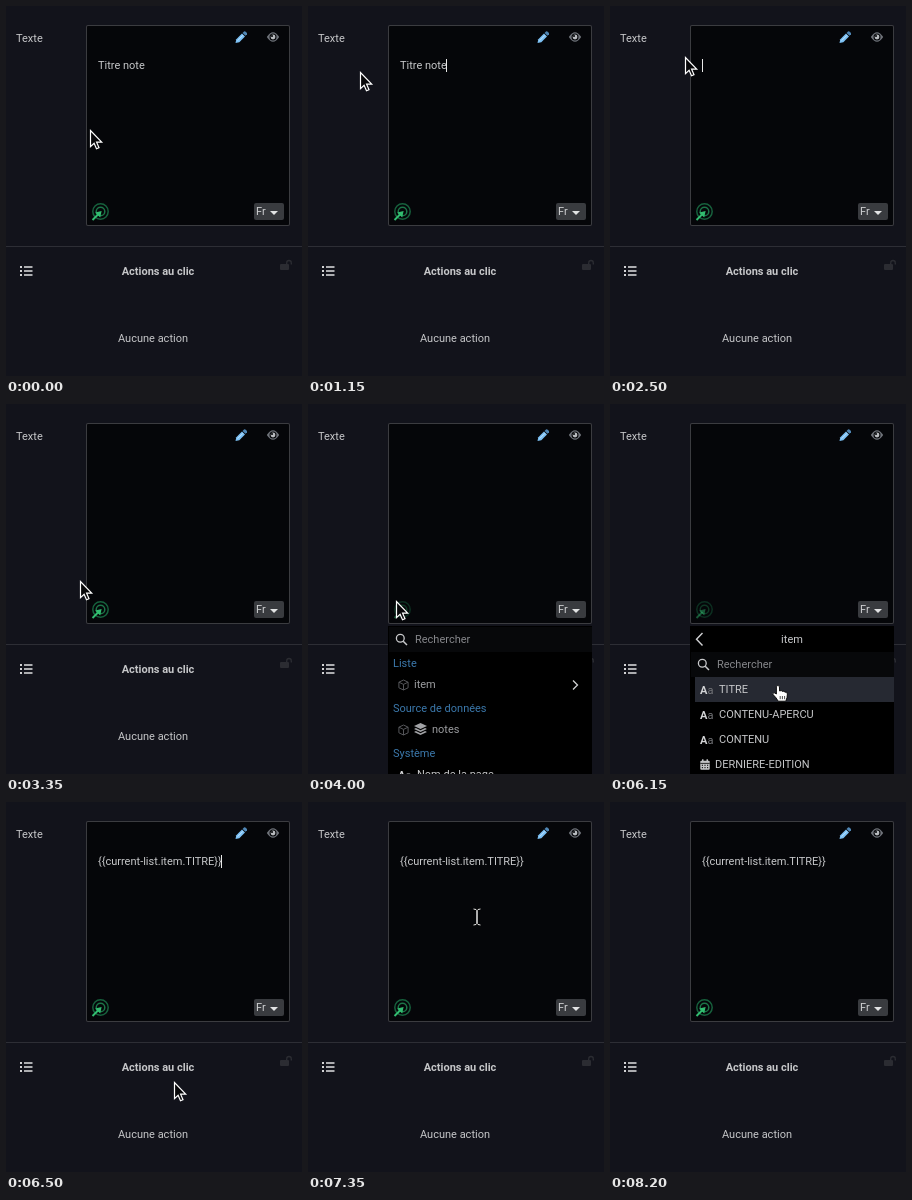
An HTML page with a canvas for the animation above (8.5 s loop, 296 by 370 pixels).

```html
<!DOCTYPE html>
<html lang="fr">
<head>
<meta charset="utf-8">
<title>Texte dynamique</title>
<style>
html, body { margin: 0; width: 100%; height: 100%; overflow: hidden; background: #12131b; }
canvas { display: block; width: 296px; height: 370px; }
</style>
</head>
<body>
<canvas id="stage"></canvas>
<script>
const W = 296, H = 370, LOOP = 8500, TICK = 50;
const canvas = document.getElementById('stage');
const ctx = canvas.getContext('2d');
const dpr = window.devicePixelRatio || 1;
canvas.width = W * dpr;
canvas.height = H * dpr;

// Pointer moves: start, end, target x, target y, shape on arrival
const MOVES = [
  [250, 300, 82, 122, 'arrow'],
  [350, 400, 143, 92, 'beam'],
  [550, 800, 160, 61, 'beam'],
  [900, 1150, 52, 66, 'arrow'],
  [1400, 1450, 71, 53, 'arrow'],
  [1750, 1800, 75, 51, 'arrow'],
  [3000, 3350, 74, 177, 'arrow'],
  [3350, 3750, 89, 195, 'arrow'],
  [3850, 3900, 88, 197, 'arrow'],
  [4300, 4350, 89, 198, 'arrow'],
  [4450, 4900, 275, 285, 'hand'],
  [5550, 5950, 195, 296, 'hand'],
  [6100, 6150, 168, 282, 'hand'],
  [6350, 6500, 168, 280, 'arrow'],
  [6700, 6850, 163, 277, 'arrow'],
  [6950, 7450, 170, 96, 'beam'],
  [7550, 7600, 168, 80, 'beam'],
  [7700, 7750, 168, 61, 'beam'],
  [7900, 8150, 79, 17, 'arrow']
];

const ease = u => u * u * (3 - 2 * u);

function pointerAt(t) {
  let x = 84, y = 124, shape = 'arrow';
  for (const [from, to, tx, ty, next] of MOVES) {
    if (t < from) break;
    const u = ease(Math.min(1, (t - from) / (to - from)));
    x += (tx - x) * u;
    y += (ty - y) * u;
    if (u > 0.5) shape = next;
  }
  return { x, y, shape };
}

function text(str, x, y, color = '#c6c7c9', weight = 400, align = 'left') {
  ctx.font = `${weight} 11px Roboto, sans-serif`;
  ctx.textAlign = align;
  ctx.fillStyle = color;
  ctx.fillText(str, x, y);
}

function rect(x, y, w, h, color) {
  ctx.fillStyle = color;
  ctx.fillRect(x, y, w, h);
}

function round(x, y, w, h, r, color) {
  ctx.beginPath();
  ctx.roundRect(x, y, w, h, r);
  ctx.fillStyle = color;
  ctx.fill();
}

function trace(pts, closed) {
  ctx.beginPath();
  for (let i = 0; i < pts.length; i += 2) ctx.lineTo(pts[i], pts[i + 1]);
  if (closed) ctx.closePath();
}

function poly(pts, color) {
  trace(pts, true);
  ctx.fillStyle = color;
  ctx.fill();
}

function line(pts, color, width = 1, closed = false) {
  trace(pts, closed);
  ctx.strokeStyle = color;
  ctx.lineWidth = width;
  ctx.stroke();
}

function ring(x, y, r, color, width, a = 0, b = Math.PI * 2) {
  ctx.beginPath();
  ctx.arc(x, y, r, a, b);
  ctx.strokeStyle = color;
  ctx.lineWidth = width;
  ctx.stroke();
}

function disc(x, y, rx, ry, color) {
  ctx.beginPath();
  ctx.ellipse(x, y, rx, ry, 0, 0, Math.PI * 2);
  ctx.fillStyle = color;
  ctx.fill();
}

function at(x, y, draw) {
  ctx.save();
  ctx.translate(x, y);
  draw();
  ctx.restore();
}

function pencil() {
  poly([229.5, 37, 230.3, 33.2, 236, 27.5, 239, 30.5, 233.3, 36.2], '#7cc0f4');
  poly([236.6, 26.9, 238.2, 25.3, 239.4, 25.4, 241, 27, 241, 28.2, 239.5, 29.8], '#4f86b5');
  line([231.6, 34.6, 237, 29.2], '#c6e6fc', 0.9);
}

function eye() {
  ctx.beginPath();
  ctx.moveTo(260.8, 31);
  ctx.quadraticCurveTo(267, 21.6, 273.2, 31);
  ctx.quadraticCurveTo(267, 40.4, 260.8, 31);
  ctx.fillStyle = '#70747b';
  ctx.fill();
  disc(267, 31, 3.5, 3.5, '#07080b');
  disc(267, 31, 2.4, 2.4, '#b9bcc0');
  disc(266, 30, 1.1, 1.1, '#07080b');
}

function target(dim) {
  ctx.globalAlpha = dim ? 0.45 : 1;
  ring(94.5, 205.5, 7.7, '#17613d', 1.5);
  ring(94.5, 205.5, 4.3, '#1c7548', 1.5);
  line([86.5, 214, 92.5, 208], '#32bd70', 2);
  poly([95.6, 205, 94.2, 211.4, 89.2, 206.4], '#32bd70');
  ctx.globalAlpha = 1;
}

function list() {
  for (const y of [261, 265, 269]) {
    rect(14, y - 1, 2, 2, '#d2d3d5');
    rect(18, y - 0.8, 8.5, 1.6, '#d2d3d5');
  }
}

function lock() {
  round(274, 258, 9, 6, 1, '#2b2c32');
  ring(283, 256.8, 2.3, '#2b2c32', 1.4, Math.PI, Math.PI * 2);
  line([280.7, 256.5, 280.7, 259], '#2b2c32', 1.4);
  line([285.3, 256.5, 285.3, 258.5], '#2b2c32', 1.4);
}

function cube() {
  const c = '#55565a';
  line([0, -5, 4.6, -2.8, 4.6, 2.8, 0, 5, -4.6, 2.8, -4.6, -2.8], c, 1, true);
  line([-4.6, -2.8, 0, -0.6, 4.6, -2.8], c);
  line([0, -0.6, 0, 5], c);
}

function layers() {
  const c = '#a2a3a6';
  poly([0, -6, 6.5, -3, 0, 0, -6.5, -3], c);
  for (const y of [0, 3]) poly([-6.5, y, -4.6, y - 0.9, 0, y + 1.2, 4.6, y - 0.9, 6.5, y, 0, y + 3], c);
}

function letters(x, y) {
  text('A', x, y, '#d3d4d6', 700);
  text('a', x + 7.5, y, '#77787c', 400);
}

function calendar() {
  round(-4.7, -3.8, 9.4, 9, 1, '#c4c5c7');
  rect(-3, -5.2, 1.5, 2.5, '#c4c5c7');
  rect(1.5, -5.2, 1.5, 2.5, '#c4c5c7');
  rect(-4.7, -1.6, 9.4, 0.8, '#000');
  for (const y of [0.2, 2.5]) for (const x of [-3.2, -0.6, 2]) rect(x, y, 1.2, 1.2, '#222');
}

function search(y, caret) {
  rect(81, y - 12, 203, 25, '#07080a');
  ring(92.3, y - 0.8, 3.9, '#c9cacc', 1.3);
  line([95.2, y + 2.2, 99, y + 6], '#c9cacc', 1.5);
  text('Rechercher', 107, y + 4, '#85868a');
  if (caret) rect(107, y - 6, 1, 13, '#e4e4e4');
}

function rootMenu(hover) {
  const blue = '#3b78ab';
  search(235, false);
  if (hover) rect(85, 268, 199, 25, '#262932');
  text('Liste', 85, 263, blue);
  at(95.5, 281, cube);
  text('item', 106, 284, '#9b9c9f');
  line([265, 276.5, 269.5, 281, 265, 285.5], '#d0d1d3', 1.3);
  text('Source de données', 85, 308, blue);
  at(95.5, 326, cube);
  at(112.5, 325, layers);
  text('notes', 124, 329, '#9b9c9f');
  text('Système', 85, 353, blue);
  letters(90, 375);
  text('Nom de la page', 109, 374);
}

function itemMenu(caret) {
  line([92.5, 229, 86.5, 235.2, 92.5, 241.5], '#d0d1d3', 1.4);
  text('item', 182, 239, '#c6c7c9', 400, 'center');
  search(260, caret);
  rect(85, 273, 199, 25, '#262932');
  ['TITRE', 'CONTENU-APERCU', 'CONTENU'].forEach((name, i) => {
    letters(90, 290 + 25 * i);
    text(name, 109, 289 + 25 * i);
  });
  at(95, 360.5, calendar);
  text('DERNIERE-EDITION', 105, 364);
}

function menu(t) {
  if (t < 3900 || t >= 6500) return;
  ctx.globalAlpha = t < 3950 || t >= 6400 ? 0.6 : 1;
  rect(80, 222, 204, 148, '#000');
  if (t < 4000) search(235, false);
  else if (t < 5250) rootMenu(t >= 4750);
  else itemMenu(t < 5700);
  ctx.globalAlpha = 1;
}

function field(t) {
  round(80, 19, 204, 201, 2, '#3b3c40');
  round(81, 20, 202, 199, 1, '#050609');
  pencil();
  eye();
  target(t >= 3900 && t < 6500);
  round(248, 197, 30, 17, 2, '#393b3f');
  text('Fr', 250, 209, '#cfd0d2');
  poly([264, 205, 272, 205, 268, 209], '#e2e3e4');

  if (t >= 1300 && t < 2500) rect(92, 52, 48, 14, '#2f65b0');
  if (t < 2500) text('Titre note', 92, 63);
  if (t >= 6500) text('{{current-list.item.TITRE}}', 92, 63);

  const on = (a, b) => t >= a && t < b;
  const caretX = on(850, 1300) ? 138 : on(2500, 3050) ? 92
    : on(6500, 7000) || on(7600, 8000) ? 215 : 0;
  if (caretX) rect(caretX, 53, 1, 13, '#e8e8e8');
}

function hand() {
  ctx.beginPath();
  ctx.moveTo(-1.6, 8);
  ctx.lineTo(-1.6, 0.6);
  ctx.quadraticCurveTo(0, -2, 1.4, 0.6);
  ctx.lineTo(1.6, 5);
  ctx.quadraticCurveTo(3.4, 3.8, 4.4, 5.4);
  ctx.quadraticCurveTo(6.2, 4.6, 7, 6.2);
  ctx.quadraticCurveTo(9.2, 5.4, 9.4, 8);
  ctx.lineTo(9, 11.5);
  ctx.lineTo(7.8, 15.2);
  ctx.lineTo(0.2, 15.2);
  ctx.lineTo(-2, 11.8);
  ctx.lineTo(-5.4, 8);
  ctx.quadraticCurveTo(-4.4, 5.4, -1.6, 8);
  ctx.fillStyle = '#fff';
  ctx.fill();
  ctx.strokeStyle = '#000';
  ctx.lineWidth = 0.9;
  ctx.stroke();
  for (const x of [2.2, 4.4, 6.6]) line([x, 10, x, 13.2], '#222', 0.8);
}

function beam() {
  const bar = [-3.5, -8, -1, -7.5, 0, -6.5, 0, 6.5, -1, 7.5, -3.5, 8];
  const mirror = bar.map((v, i) => i % 2 ? v : -v);
  for (const [color, w] of [['#000', 2.2], ['#e8e8e8', 1]]) {
    line(bar, color, w);
    line(mirror, color, w);
  }
}

function arrow() {
  const pts = [0.5, 0.5, 0.5, 16.6, 4.1, 13.2, 6.5, 18.8, 9, 17.7, 6.6, 12.2, 11.7, 12.2];
  poly(pts, '#08080a');
  line(pts, '#fff', 1.2, true);
}

const shapes = { arrow, beam, hand };

function draw(t) {
  ctx.setTransform(dpr, 0, 0, dpr, 0, 0);
  rect(0, 0, W, H, '#12131b');
  text('Texte', 10, 36);
  field(t);
  rect(0, 240, W, 1, '#2d2e35');
  list();
  text('Actions au clic', 152, 269, '#c6c7c9', 700, 'center');
  lock();
  text('Aucune action', 147, 336, '#c6c7c9', 400, 'center');
  menu(t);
  if (t < 8200) {
    const p = pointerAt(t);
    at(Math.round(p.x), Math.round(p.y), shapes[p.shape]);
  }
}

const start = performance.now();
function frame() {
  const t = (performance.now() - start) % LOOP;
  draw(Math.floor(t / TICK) * TICK);
  requestAnimationFrame(frame);
}
frame();
</script>
</body>
</html>
```
